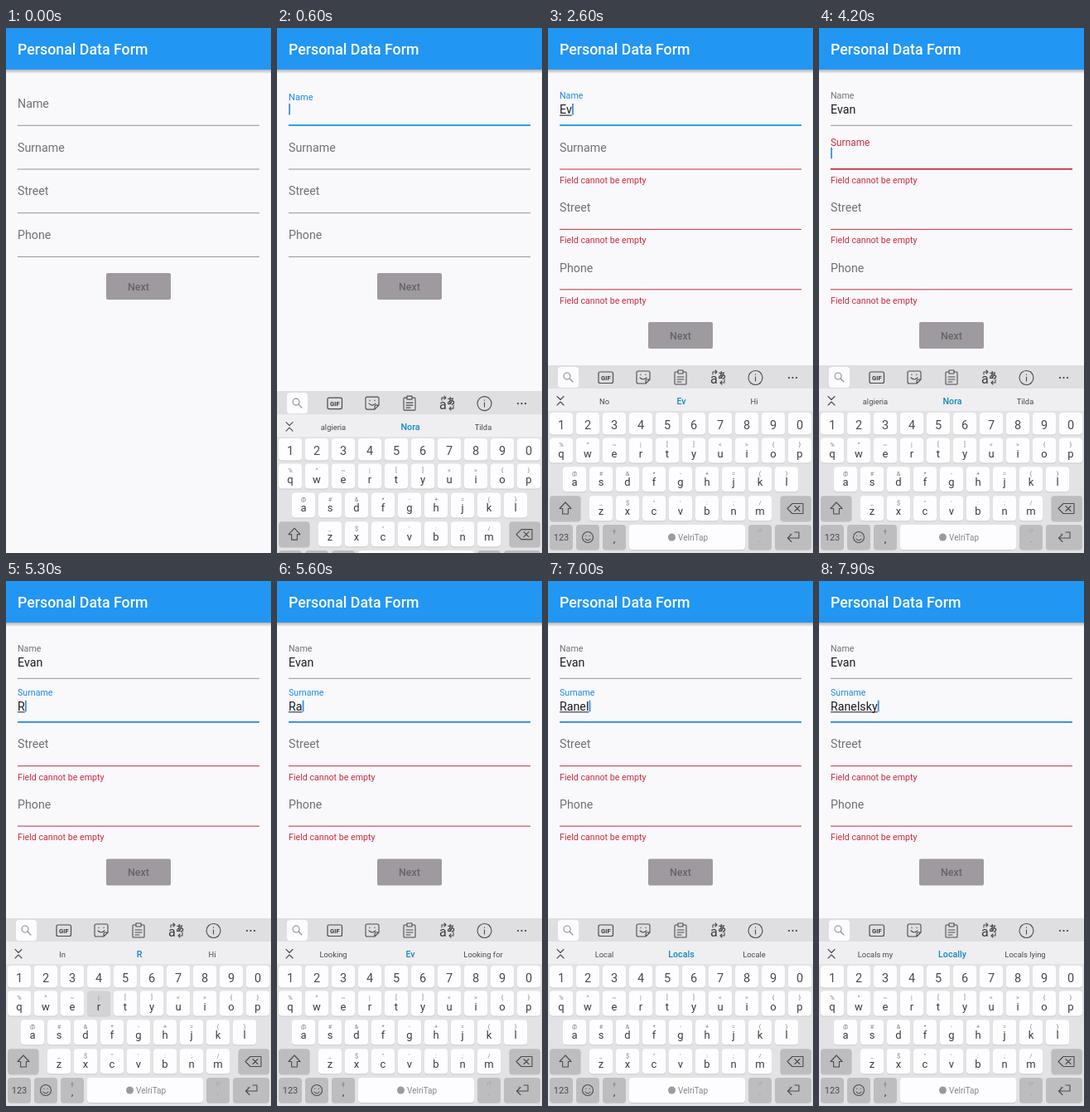
Write an HTML page that moves like this. It is 320 px wide and 632 px high and loops after 8 s.

```html
<!DOCTYPE html>
<html lang="en">
<head>
<meta charset="utf-8">
<title>Personal Data Form</title>
<style>
html, body { margin: 0; width: 100%; height: 100%; overflow: hidden; background: #f9f8fb; }
svg { display: block; width: 100vw; height: 100vh; font-family: Roboto, sans-serif; }
</style>
</head>
<body>
<svg id="stage" viewBox="0 0 320 632"></svg>
<script>
const LOOP = 8000, STEP = 100;
const BLUE = '#1e88e5', RED = '#c62f3f', GREY = '#717073', INK = '#3b3a3d';
const LEFT = 14, RIGHT = 306, PITCH = 52.7, ERR_H = 19.7;

const stage = document.getElementById('stage');
function el(parent, tag, attrs = {}, text) {
  const node = document.createElementNS('http://www.w3.org/2000/svg', tag);
  set(node, attrs);
  if (text !== undefined) node.textContent = text;
  parent.append(node);
  return node;
}
function set(node, attrs) {
  for (const k in attrs) node.setAttribute(k, attrs[k]);
}
const rect = (p, x, y, width, height, fill, rx = 0) =>
  el(p, 'rect', { x, y, width, height, fill, rx });
const label = (p, x, y, size, fill, text, more = {}) =>
  el(p, 'text', { x, y, 'font-size': size, fill, ...more }, text);
const mid = { 'text-anchor': 'middle' };
const icon = (p, d, more = {}) => el(p, 'path', {
  d, fill: 'none', stroke: '#4c4b4e', 'stroke-width': 1.1,
  'stroke-linecap': 'round', 'stroke-linejoin': 'round', ...more });

// cubic-bezier(.4, 0, .2, 1)
function ease(x) {
  if (x <= 0) return 0;
  if (x >= 1) return 1;
  let lo = 0, hi = 1, s = .5;
  for (let i = 0; i < 20; i++) {
    s = (lo + hi) / 2;
    const bx = 1.2 * s * (1 - s) ** 2 + .6 * s * s * (1 - s) + s ** 3;
    if (bx < x) lo = s; else hi = s;
  }
  return 3 * s * s * (1 - s) + s ** 3;
}
const clamp = v => Math.max(0, Math.min(1, v));
const lerp = (a, b, p) => a + (b - a) * p;
const within = (t, a, b) => t >= a && t < b;

// Timeline
const strokes = [
  [2000, 'E'], [2300, 'v'], [2800, 'a'], [3100, 'n'],
  [5300, 'R'], [5500, 'a'], [6000, 'n'], [6300, 'e'],
  [6700, 'l'], [7200, 's'], [7500, 'k'], [7800, 'y']
];
const hints = [
  [0, 'algieria', 'Nora', 'Tilda'], [1700, 'Algieria', 'Nora', 'Tilda'],
  [2000, 'In', 'E', 'Hi'], [2300, 'No', 'Ev', 'Hi'],
  [2800, 'Even', 'Eva', 'Ever'], [3100, 'Even', 'Evan', 'Evening'],
  [4100, 'algieria', 'Nora', 'Tilda'], [5000, 'Algieria', 'Nora', 'Tilda'],
  [5300, 'In', 'R', 'Hi'], [5500, 'Looking', 'Ev', 'Looking for'],
  [6000, 'Lot', 'Low', 'Lower'], [6300, 'Lose', 'Love', 'Lovely'],
  [6700, 'Local', 'Locals', 'Locale'], [7200, 'Locals', 'Local', 'Locale'],
  [7500, 'Locals', 'Lock', 'Locks'], [7800, 'Locals my', 'Locally', 'Locals lying']
];
const FOCUS = [480, 4116];
const typed = (t, a, b) =>
  strokes.filter(([at]) => at <= t && at >= a && at < b).map(s => s[1]).join('');

// Form
rect(stage, 0, 0, 320, 632, '#f9f8fb');
const defs = el(stage, 'defs');
const shade = el(defs, 'linearGradient', { id: 'shade', x2: 0, y2: 1 });
el(shade, 'stop', { offset: 0, 'stop-color': '#000', 'stop-opacity': .28 });
el(shade, 'stop', { offset: 1, 'stop-color': '#000', 'stop-opacity': 0 });
rect(stage, 0, 50, 320, 5, 'url(#shade)');
rect(stage, 0, 0, 320, 50, '#2196f3');
label(stage, LEFT, 32.3, 17.78, '#fff', 'Personal Data Form', { 'font-weight': 500 });

const fields = ['Name', 'Surname', 'Street', 'Phone'].map(name => {
  const g = el(stage, 'g');
  return {
    g,
    name: label(g, LEFT, 96, 14.22, GREY, name),
    value: label(g, LEFT, 103.1, 14.22, '#1c1b1e', ''),
    under: rect(g, LEFT, 104.6, 0, 1, '#1c1b1e'),
    line: rect(g, LEFT, 116.8, RIGHT - LEFT, 1, '#949296'),
    error: label(g, LEFT, 134.3, 10.67, RED, 'Field cannot be empty'),
    caret: rect(g, LEFT, 91, 1.8, 13.6, '#3f8fdc')
  };
});
const button = el(stage, 'g');
rect(button, 121, 295, 78, 32, '#9e9a9f', 2);
label(button, 160, 315.5, 12.44, '#676469', 'Next', { 'font-weight': 500, ...mid });

// Keyboard
const board = el(stage, 'g');
rect(board, 0, 406, 320, 226, '#e3e2e5');
rect(board, 0, 406, 320, 28, '#dfdee1');
rect(board, 0, 434, 320, 27, '#efeef1');

rect(board, 12, 408, 25, 25, '#fcfbfd', 4);
icon(board, 'M19 419a4 4 0 1 0 8 0a4 4 0 1 0 -8 0M26 422l4 4', { stroke: '#8d8c8f' });
el(board, 'rect', { x: 61, y: 414, width: 17.5, height: 13.5, rx: 2, fill: 'none', stroke: '#4c4b4e', 'stroke-width': 1.2 });
label(board, 69.8, 423.6, 7.6, INK, 'GIF', { 'font-weight': 700, ...mid });
icon(board, 'M109 413h12q2 0 2 2v8l-5 5h-9q-2 0-2-2v-11q0-2 2-2M118 428v-3q0-2 2-2h3M111 421q4 4 8 0M112 417v.6M118 417v.6');
icon(board, 'M157 414h-3q-1 0-1 1v13q0 1 1 1h12q1 0 1-1v-13q0-1-1-1h-3M157 412h6v4h-6zM156 420h8M156 423h8M156 426h5');
label(board, 196, 428, 16, INK, 'a');
label(board, 205, 421.5, 10, INK, 'あ', { 'font-family': '"Noto Sans CJK JP", "Noto Sans CJK", sans-serif', 'font-weight': 700 });
icon(board, 'M199 417v-3h5M202 412l2 2l-2 2M213 423v4h-5M210 425l-2 2l2 2');
icon(board, 'M242 421a8.5 8.5 0 1 0 17 0a8.5 8.5 0 1 0 -17 0M250.5 420v5M250.5 416.8v.4');
for (const x of [291, 295.5, 300]) el(board, 'circle', { cx: x, cy: 421, r: 1.1, fill: INK });
icon(board, 'M11 443.5l4 4l4-4M11 454l4-4l4 4');

const words = [68, 161, 249].map((x, i) => label(board, x, 452.6, i === 1 ? 10.7 : 9.4,
  i === 1 ? '#128bbb' : '#4a494c', '', i === 1 ? { 'font-weight': 500, ...mid } : mid));

function key(x, y, w, h, fill = '#fdfcfe') {
  rect(board, x, y + 1, w, h, '#c9c8cb', 4);
  return rect(board, x, y, w, h, fill, 4);
}
const DARK = '#bdbcbf';
[...'1234567890'].forEach((d, i) => {
  key(2 + 32 * i, 463, 28, 26.5);
  label(board, 16 + 32 * i, 482.8, 14.5, '#4a494c', d, mid);
});
const letters = {};
[['qwertyuiop', '%^~|[]<>{}', 16, 493.5], ['asdfghjkl', '@#&*-+=()', 32, 528.3],
 ['zxcvbnm', '_$"\':;/', 64, 563.2]].forEach(([row, signs, x0, y]) => {
  [...row].forEach((ch, i) => {
    const x = x0 + 32 * i;
    const cap = key(x - 14, y, 28, 30);
    label(board, x, y + 10.4, 7.4, '#838285', signs[i], mid);
    letters[ch] = { cap, text: label(board, x, y + 23, 13, INK, ch, mid) };
  });
});

const shiftCap = key(2, 563.2, 37.5, 30.5, DARK);
const shiftIcon = icon(board, 'M21 571l7 7.5h-3.6v6.5h-6.8v-6.5H14z');
key(280.5, 563.2, 37.5, 30.5, DARK);
icon(board, 'M295 572.5h13v12h-13l-6-6zM298 575.5l6 6M304 575.5l-6 6');

key(2, 598, 28, 30, DARK);
label(board, 16, 617, 11, '#4c4b4e', '123', mid);
key(34, 598, 28, 30, DARK);
icon(board, 'M41.5 613a6.5 6.5 0 1 0 13 0a6.5 6.5 0 1 0 -13 0M45 615q3 3.5 6 0M45.8 611v.3M50.2 611v.3');
key(66, 598, 28, 30, DARK);
icon(board, 'M80 603.5v3M78.5 606q1.5 2.5 3 0M80 608v1', { 'stroke-width': .8, stroke: '#777679' });
label(board, 80, 619, 13, INK, ',', mid);
key(98, 598, 140, 30);
el(board, 'circle', { cx: 149.5, cy: 613, r: 4.5, fill: '#9b9a9d' });
label(board, 157, 616.6, 10, '#858487', 'VelriTap');
key(242, 598, 28, 30, DARK);
label(board, 256, 608.4, 7.4, '#a09fa2', '!?', mid);
label(board, 256, 619, 13, '#9b9a9d', '.', mid);
key(274, 598, 44, 30, DARK);
icon(board, 'M292 609v-0M303 607v7h-13M294 609.5l-4.5 4.5l4.5 4.5M303 607h-5');

function drawField(f, i, t, y, failed) {
  const focused = i === 0 ? within(t, 500, 4100) : i === 1 && t >= 4100;
  const p = i < 2 ? ease((t - FOCUS[i]) / 200) : 0;
  const text = i === 0 ? typed(t, 0, 4100) : i === 1 ? typed(t, 4100, LOOP) : '';
  const tone = failed ? RED : i === 0 ? '#169dcc' : BLUE;
  set(f.g, { transform: `translate(0 ${y})` });
  set(f.name, {
    y: lerp(96, 85.4, p), 'font-size': lerp(14.22, 10.67, p),
    fill: focused ? (failed ? RED : BLUE) : GREY
  });
  f.value.textContent = text;
  const w = text ? f.value.getComputedTextLength() : 0;
  set(f.under, { width: focused ? w : 0 });
  set(f.line, {
    y: focused ? 116.2 : 116.8, height: focused ? 1.8 : 1,
    fill: focused || failed ? tone : '#949296'
  });
  set(f.error, { opacity: failed ? clamp((t - 1950) / 167) : 0 });
  const off = within(t, 1000, 1500) || within(t, 3700, 4100) || within(t, 4700, 5000);
  set(f.caret, { x: LEFT + w + .2, opacity: focused && !off ? 1 : 0 });
}

function draw(t) {
  let y = 0;
  fields.forEach((f, i) => {
    const failed = i > 0 && t >= 2000 && !(i === 1 && t >= 5300);
    drawField(f, i, t, y, failed);
    y += PITCH + (failed ? ERR_H : 0);
  });
  set(button, { transform: `translate(0 ${y - 4 * PITCH})` });

  set(board, { transform: `translate(0 ${t < 500 ? 240 : 226 * (1 - ease((t - 460) / 240))})` });
  const upper = within(t, 1700, 2000) || within(t, 5000, 5300);
  const down = strokes.find(([at]) => within(t, at, at + STEP));
  for (const ch in letters) {
    letters[ch].text.textContent = upper ? ch.toUpperCase() : ch;
    const hit = down && down[1].toLowerCase() === ch;
    set(letters[ch].cap, { fill: hit ? '#d3d2d5' : '#fdfcfe' });
  }
  set(shiftCap, { fill: within(t, 1700, 1800) ? '#9f9ea1' : DARK });
  set(shiftIcon, { fill: upper ? '#4c4b4e' : 'none' });
  const hint = hints.filter(h => h[0] <= t).pop();
  words.forEach((w, i) => { w.textContent = hint[i + 1]; });
}

const start = performance.now();
function tick(now) {
  const t = Math.max(0, now - start) % LOOP;
  draw(Math.floor(t / STEP) * STEP);
  requestAnimationFrame(tick);
}
draw(0);
requestAnimationFrame(tick);
</script>
</body>
</html>
```
